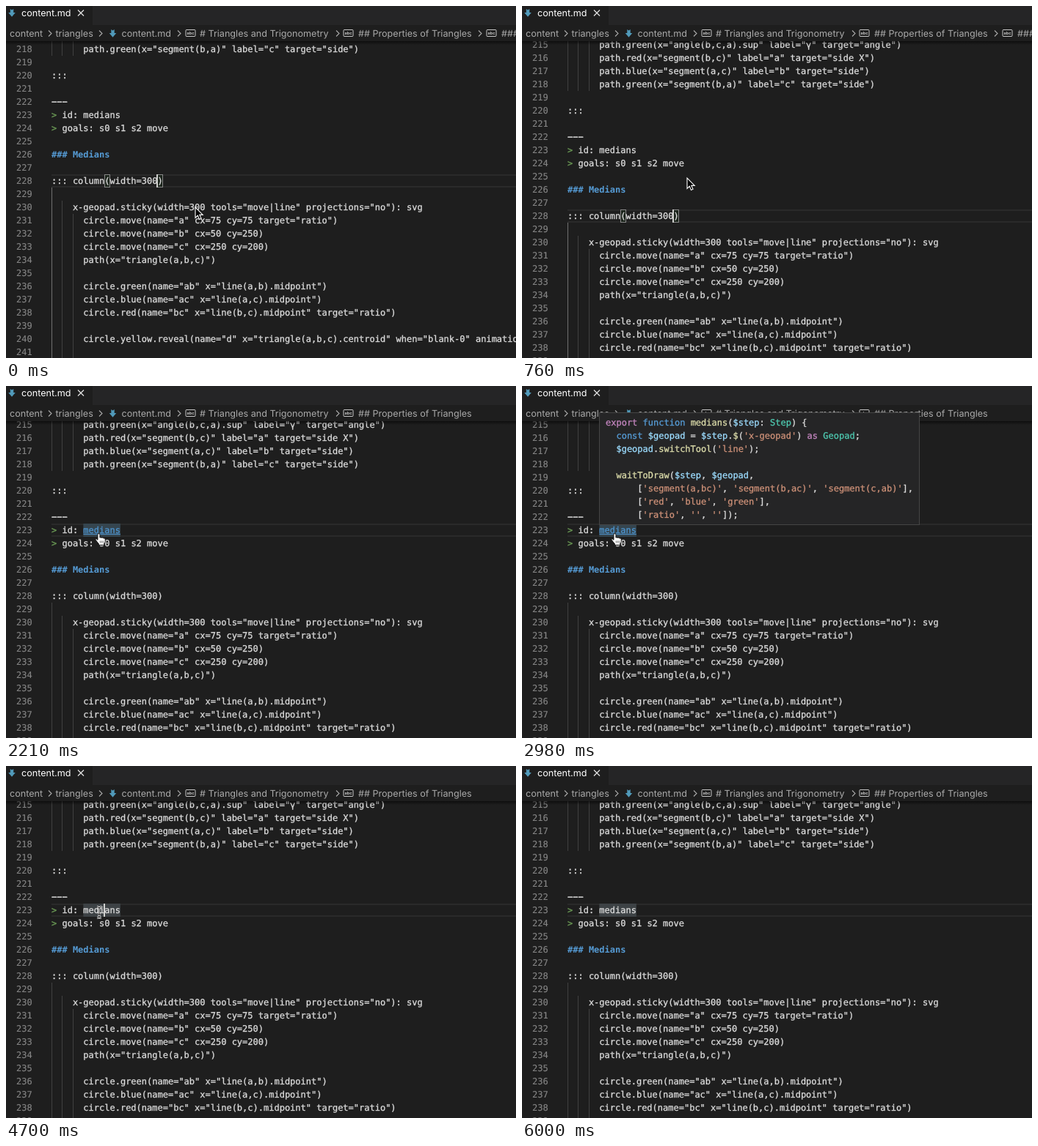
Write an HTML page that moves like this. It is 695 px wide and 481 px high and loops after 6100 ms.

```html
<!DOCTYPE html>
<html lang="en">
<head>
<meta charset="utf-8">
<title>Editor hover preview</title>
<style>
html, body { margin: 0; width: 100%; height: 100%; overflow: hidden; background: #1e1e1e; }
svg { display: block; width: 100%; height: 100%; }
text { white-space: pre; text-rendering: geometricPrecision; }
.code { font: 12px "DejaVu Sans Mono", monospace; color: #dcdcdc; fill: currentColor; stroke: currentColor; stroke-width: .3; }
.num { color: #858585; stroke-width: .15; }
.ui { font: 12.6px Inter, sans-serif; fill: #a9a9a9; }
.abc { font: 700 5.5px Inter, sans-serif; fill: #c5c5c5; text-anchor: middle; }
</style>
</head>
<body>
<svg id="stage" viewBox="0 0 695 481">
  <defs>
    <clipPath id="view"><rect y="48" width="695" height="433"/></clipPath>
    <linearGradient id="shade" x2="0" y2="1">
      <stop stop-color="#000" stop-opacity=".55"/><stop offset="1" stop-color="#000" stop-opacity="0"/>
    </linearGradient>
  </defs>
  <rect width="695" height="481" fill="#1e1e1e"/>
  <g clip-path="url(#view)"><g id="doc"></g></g>
  <rect y="48" width="695" height="5" fill="url(#shade)"/>
  <g id="bar"></g>
  <g id="popup"></g>
  <g id="arrow">
    <path d="M0 0V14.4L3.3 11.3L5.5 16.4L8 15.3L5.8 10.4H10.2Z" fill="#000" stroke="#fff" stroke-width="1.1"/>
  </g>
  <g id="beam" fill="none">
    <path d="M-3-7.5Q0-7.5 0-5.5V5.5Q0 7.5-3 7.5M3-7.5Q0-7.5 0-5.5M0 5.5Q0 7.5 3 7.5M-2 2.5H2" stroke="#fff" stroke-width="2.6"/>
    <path d="M-3-7.5Q0-7.5 0-5.5V5.5Q0 7.5-3 7.5M3-7.5Q0-7.5 0-5.5M0 5.5Q0 7.5 3 7.5M-2 2.5H2" stroke="#111"/>
  </g>
  <g id="hand" transform="translate(127 202)">
    <path d="M-2 1.2Q-2-.3-.6-.3T.9 1.2V5.2Q2 4.2 3.2 5.4Q4.6 4.6 5.7 6Q7.4 5.4 8.2 7.2V10Q8 12 6.8 13V15.3H-.6V13.6Q-2.5 11.5-4.8 8.3C-5.6 6.6-3.8 6.2-2 8.4Z" fill="#fff" stroke="#111" stroke-width=".9"/>
    <path d="M1.3 9.5V12.5M3.3 9.5V12.5M5.3 9.5V12.5" stroke="#333" stroke-width=".7"/>
  </g>
</svg>
<script>
const LOOP = 6100, CH = 7.224, LEFT = 62, ROW = 18, FIRST = 215;
const $ = id => document.getElementById(id);

function add(parent, tag, attrs, content = '') {
  const el = document.createElementNS('http://www.w3.org/2000/svg', tag);
  for (const key in attrs) el.setAttribute(key, attrs[key]);
  el.textContent = content;
  return parent.appendChild(el);
}

// Each entry: indent in characters, then the text of the line.
const lines = [
  [6, 'path.green(x="angle(b,c,a).sup" label="γ" target="angle")'],
  [6, 'path.red(x="segment(b,c)" label="a" target="side X")'],
  [6, 'path.blue(x="segment(a,c)" label="b" target="side")'],
  [6, 'path.green(x="segment(b,a)" label="c" target="side")'],
  [0, ''],
  [0, ':::'],
  [0, ''],
  [0, '−−−'],
  [0, '> id: '],
  [0, '> goals: s0 s1 s2 move'],
  [0, ''],
  [0, '### Medians'],
  [0, ''],
  [0, '::: column(width=300)'],
  [2, ''],
  [4, 'x-geopad.sticky(width=300 tools="move|line" projections="no"): svg'],
  [6, 'circle.move(name="a" cx=75 cy=75 target="ratio")'],
  [6, 'circle.move(name="b" cx=50 cy=250)'],
  [6, 'circle.move(name="c" cx=250 cy=200)'],
  [6, 'path(x="triangle(a,b,c)")'],
  [6, ''],
  [6, 'circle.green(name="ab" x="line(a,b).midpoint")'],
  [6, 'circle.blue(name="ac" x="line(a,c).midpoint")'],
  [6, 'circle.red(name="bc" x="line(b,c).midpoint" target="ratio")'],
  [6, ''],
  [6, 'circle.yellow.reveal(name="d" x="triangle(a,b,c).centroid" when="blank-0" animation="pop")'],
  [6, '']
];

const col = n => LEFT + n * CH;
const lineTop = n => 188 + (n - 223) * ROW;
const doc = $('doc');

const current = add(doc, 'g', {});
for (const y of [0, 16]) add(current, 'rect', { x: LEFT, y, width: 640, height: 2, fill: '#2a2a2a' });

const wordBox = add(doc, 'rect', { x: col(6), y: 188, width: 7 * CH, height: ROW });

const brackets = add(doc, 'g', {});
for (const n of [10, 20]) {
  add(brackets, 'rect', {
    x: Math.round(col(n)) + .5, y: lineTop(228) + .5, width: 7, height: 17,
    fill: '#1c251c', stroke: '#888'
  });
}

lines.forEach(([indent, str], i) => {
  const n = FIRST + i, top = lineTop(n), y = top + 13;
  for (let k = 0; k < indent; k += 2) {
    add(doc, 'rect', { x: Math.round(col(k)), y: top, width: 1, height: ROW, fill: '#404040' });
  }
  add(doc, 'text', { x: 14, y, class: 'code num' }, n);
  const text = add(doc, 'text', { x: col(indent), y, class: 'code' });
  if (str[0] === '>') {
    add(text, 'tspan', { color: '#6a9955' }, '>');
    add(text, 'tspan', {}, str.slice(1));
  } else {
    text.textContent = str;
    if (str[0] === '#') text.setAttribute('style', 'color:#569cd6;font-weight:700;stroke:none');
  }
});

const activeGuide = add(doc, 'rect', { x: LEFT, y: lineTop(229), width: 1, height: 13 * ROW, fill: '#707070' });
const word = add(doc, 'text', { x: col(6), y: 201, class: 'code' }, 'medians');
const underline = add(doc, 'rect', { x: col(6), y: 202, width: 7 * CH, height: 1, fill: '#4e94ce' });
const caret = add(doc, 'rect', { width: 2, height: ROW, fill: '#d0d0ce' });

// Tab and breadcrumbs
const bar = $('bar');
const label = (parent, x, y, str) => add(parent, 'text', { x, y, class: 'ui' }, str);
const fileIcon = (x, y) => add(bar, 'path', {
  d: 'M-2.2-5.5L0-4L2.2-5.5V-.5H4.8L0 5.2L-4.8-.5H-2.2Z', fill: '#519aba', transform: `translate(${x} ${y})`
});
const chevron = (parent, x) => add(parent, 'path', {
  d: `M${x - 2} 33.5l4 4l-4 4`, fill: 'none', stroke: '#a9a9a9', 'stroke-width': 1.1
});
function symbolIcon(parent, x) {
  add(parent, 'rect', { x: x - 6.5, y: 32.5, width: 13, height: 9, rx: 1, fill: 'none', stroke: '#c5c5c5' });
  add(parent, 'text', { x, y: 39, class: 'abc' }, 'abc');
}

add(bar, 'rect', { x: 118, width: 577, height: 26, fill: '#252526' });
fileIcon(8, 9.5);
label(bar, 21, 14, 'content.md').style.fill = '#fff';
add(bar, 'path', { d: 'M98 5.5l8 8M106 5.5l-8 8', stroke: '#e4e4e4', 'stroke-width': 1.2 });

label(bar, 5, 42, 'content');
chevron(bar, 60);
label(bar, 67.5, 42, 'triangles');
chevron(bar, 129);
fileIcon(145.5, 37.5);
label(bar, 157.5, 42, 'content.md');
chevron(bar, 236);
symbolIcon(bar, 251.5);
label(bar, 264, 42, '# Triangles and Trigonometry');
chevron(bar, 452);
symbolIcon(bar, 466.5);
label(bar, 480, 42, '## Properties of Triangles');
const lastCrumb = add(bar, 'g', {});
chevron(lastCrumb, 646);
symbolIcon(lastCrumb, 661.5);
label(lastCrumb, 675, 42, '### Medians');

// Hover preview with simple syntax colours
const popup = $('popup');
const preview = `export function medians($step: Step) {
  const $geopad = $step.$('x-geopad') as Geopad;
  $geopad.switchTool('line');

  waitToDraw($step, $geopad,
      ['segment(a,bc)', 'segment(b,ac)', 'segment(c,ab)'],
      ['red', 'blue', 'green'],
      ['ratio', '', '']);`;
const token = /('[^']*')|\b(export|as)\b|\b(function|const)\b|(medians|switchTool|waitToDraw|\$(?=\())|\b(Step|Geopad)\b|(\$\w+)/g;
const colors = ['#ce9178', '#c586c0', '#569cd6', '#dcdcaa', '#4ec9b0', '#9cdcfe'];

add(popup, 'rect', { x: 105.5, y: 36.5, width: 436, height: 153, fill: '#252526', stroke: '#454545' });
preview.split('\n').forEach((row, i) => {
  const str = row.trimStart();
  const text = add(popup, 'text', { x: 114 + (row.length - str.length) * CH, y: 54 + i * ROW, class: 'code' });
  let pos = 0;
  for (const m of str.matchAll(token)) {
    add(text, 'tspan', {}, str.slice(pos, m.index));
    add(text, 'tspan', { color: colors[m.slice(1).findIndex(Boolean)] }, m[0]);
    pos = m.index + m[0].length;
  }
  add(text, 'tspan', {}, str.slice(pos));
});

// Mouse moves: start, end, from point, to point
const moves = [
  [90, 440, [258, 275], [225, 235]],
  [870, 1520, [225, 235], [127, 200]],
  [5070, 5720, [127, 201], [667, 492]]
];
const ease = p => p * p * (3 - 2 * p);

function mouseAt(t) {
  let pos = moves[0][2];
  for (const [start, end, a, b] of moves) {
    if (t < start) break;
    const p = ease(Math.min(1, (t - start) / (end - start)));
    pos = a.map((v, i) => v + (b[i] - v) * p);
  }
  return pos;
}

const scrollAt = t => t < 610 ? 0 : t < 670 ? 9 : t < 760 ? 30 : 48;
const within = (t, a, b) => t >= a && t < b;
const blinks = [[0, 2080], [2500, 2980], [3450, 3990], [4410, 4930], [5450, 6000]];
const show = (el, on) => el.setAttribute('visibility', on ? 'visible' : 'hidden');

function draw(t) {
  const clicked = t >= 1580, link = within(t, 1980, 4410), hand = within(t, 1980, 4460);
  const [x, y] = mouseAt(t);
  const top = lineTop(clicked ? 223 : 228);

  doc.setAttribute('transform', `translate(0 ${scrollAt(t) - 48})`);
  current.setAttribute('transform', `translate(0 ${top})`);
  caret.setAttribute('transform', `translate(${Math.floor(col(clicked ? 10 : 20)) - 1} ${top})`);
  show(brackets, !clicked);
  show(activeGuide, t < 1520);
  show(wordBox, t >= 1800);
  show(lastCrumb, t < 1800);
  show(caret, blinks.some(([a, b]) => within(t, a, b)));

  wordBox.setAttribute('fill', link ? '#35454f' : '#3d4245');
  word.style.color = link ? '#4e94ce' : '#dcdcdc';
  show(underline, link);
  show(popup, within(t, 2270, 4700));
  popup.setAttribute('opacity', t < 2330 ? .6 : 1);

  show($('arrow'), t < 1520);
  show($('beam'), t >= 1520 && !hand);
  show($('hand'), hand);
  $('arrow').setAttribute('transform', `translate(${x} ${y})`);
  $('beam').setAttribute('transform', `translate(${x} ${y})`);
}

const begin = performance.now();
function tick() {
  draw((performance.now() - begin) % LOOP);
  requestAnimationFrame(tick);
}
tick();
</script>
</body>
</html>
```
